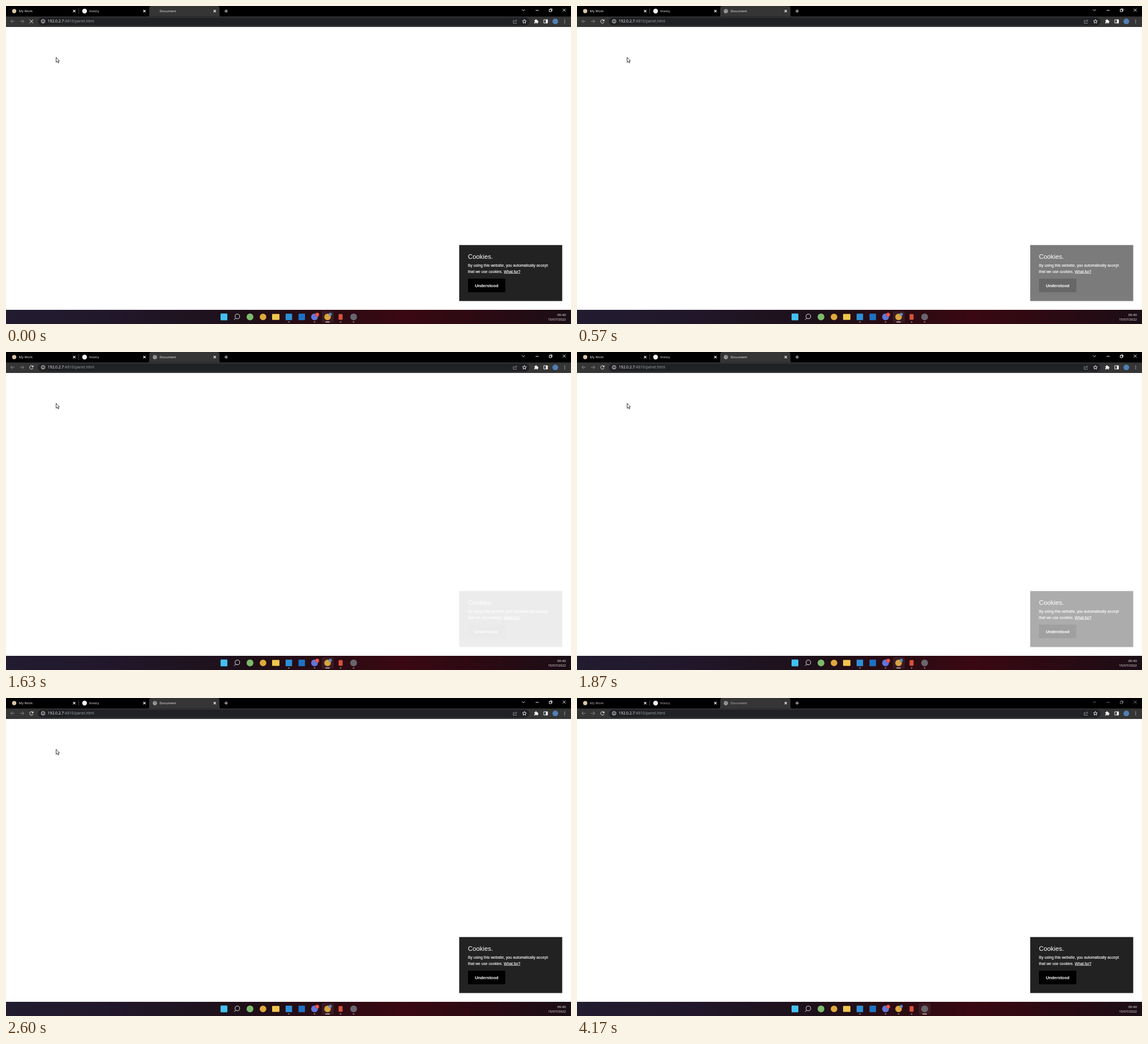
Animation, 998 px wide and 561 px high, one loop 4260 ms. Source, as an HTML page:

```html
<!DOCTYPE html>
<html lang="en">
<head>
<meta charset="utf-8">
<title>Cookie notice</title>
<style>
  html, body { margin: 0; width: 100%; height: 100%; overflow: hidden; background: #fff; }
  svg { display: block; width: 100vw; height: 100vh; }
  .ui { font: 6px "Open Sans", "Noto Sans", sans-serif; fill: #f2f2f2; }
  .url { font-size: 6.75px; fill: #9aa0a6; }
  .url tspan { fill: #f1f1f1; }
  .page { font: 6.77px "Liberation Sans", Arial, sans-serif; fill: #fff; }
  .copy { stroke: #fff; stroke-width: .12; }
  .line { fill: none; stroke: #e8e8e8; stroke-width: 1; }
  .dim { stroke: #85868a; }
  .blurred .tab { fill: #c2c2c2; }
  .blurred .win { stroke: #77787a; }
</style>
</head>
<body>
<svg id="stage" viewBox="0 0 998 561" preserveAspectRatio="none">
  <defs>
    <linearGradient id="bar">
      <stop offset="0" stop-color="#221c30"/>
      <stop offset=".2" stop-color="#21172a"/>
      <stop offset=".42" stop-color="#1e1019"/>
      <stop offset=".58" stop-color="#2b0b13"/>
      <stop offset=".7" stop-color="#3a0812"/>
      <stop offset=".85" stop-color="#2b0a13"/>
      <stop offset="1" stop-color="#1b0e16"/>
    </linearGradient>
  </defs>
  <rect width="998" height="561" fill="#fff"/>

  <!-- tab strip -->
  <rect width="998" height="19" fill="#000"/>
  <path d="M250 18.500Q253 18.500 253 15V4Q253 0 257 0H373Q377 0 377 4V15Q377 18.500 380 18.500Z" fill="#353535"/>
  <path d="M128.500 4V14" class="line" stroke-opacity=".3"/>
  <circle cx="14.500" cy="9" r="3.700" fill="#dcc5a6"/>
  <circle cx="138.800" cy="9" r="4.200" fill="#f4f4f4"/>
  <g id="favicon">
    <circle cx="263" cy="9" r="3.700" fill="#a0a2a5"/>
    <path d="M260 8Q262 7 263 9T265.500 11M262.500 5.800Q264 7.500 266 7.200" fill="none" stroke="#55575a" stroke-width=".9"/>
  </g>
  <g class="ui">
    <text class="tab" x="22.500" y="11">My Work</text>
    <text class="tab" x="146.700" y="11">Vostry</text>
    <text class="tab" x="271.200" y="11">Document</text>
  </g>
  <g id="closers" class="line"></g>
  <path class="line" d="M385.700 9H392M388.850 5.850V12.150"/>
  <g class="line win">
    <path class="line win" d="M911.500 6L914 8.500 916.500 6" stroke-width=".9"/>
    <path class="line win" d="M935.500 7.700H941"/>
    <path class="line win" d="M959.500 6.200H963.300V10H959.500ZM960.700 6V5H964.500V8.800H963.500" stroke-width=".8"/>
    <path class="line win" d="M983.500 4.800L988.500 9.800M988.500 4.800L983.500 9.800"/>
  </g>

  <!-- toolbar -->
  <rect y="18.500" width="998" height="18.500" fill="#353535"/>
  <rect x="56.500" y="20.500" width="868" height="14" rx="7" fill="#202124"/>
  <path d="M15 27H8.500M11.500 24L8.500 27 11.500 30M25 27H31.500M28.500 24L31.500 27 28.500 30" class="line dim"/>
  <path id="stop" class="line" d="M41.700 24L48 30.300M48 24L41.700 30.300" stroke-width="1.200"/>
  <g id="reload">
    <path class="line" d="M47.400 25.300A3.100 3.100 0 1 0 47.800 28.300" stroke-width="1.100"/>
    <path d="M48.400 23.300V26.700H45Z" fill="#e8e8e8"/>
  </g>
  <circle cx="65.500" cy="27" r="3.200" class="line" stroke-width=".8"/>
  <path d="M65.500 26.500V29M65.500 25V25.800" class="line" stroke-width=".9"/>
  <text class="ui url" x="73.700" y="29.400"><tspan>192.0.2.7</tspan>:4810/panel.html</text>
  <path class="line dim" d="M897.500 25.500H896V30.500H901.500V29M897.700 28.300Q898 25.800 901.500 25.800M900.300 24L902.300 25.800 900.300 27.600" stroke-width=".9"/>
  <path class="line" id="star" stroke-width=".8"/>
  <path d="M933.200 24.900H935Q934.900 23.200 936.200 23.200T937.400 24.900H939.200V26.500Q940.500 26.500 940.500 27.700T939.200 28.900V30.700H937.400Q937.300 29.500 936.200 29.500T935 30.700H933.200V28.900Q934.300 28.800 934.300 27.700T933.200 26.500Z" fill="#f0f0f0"/>
  <path class="line" d="M949.900 24.200H956.600V30H949.900Z"/>
  <path d="M953.500 24H957V30.200H953.500Z" fill="#f0f0f0"/>
  <circle cx="970.300" cy="27.200" r="5" fill="#517fb5"/>
  <path d="M986.800 24V25.300M986.800 26.500V27.800M986.800 29V30.300" class="line" stroke-width="1.400"/>

  <!-- notice -->
  <g id="notice" class="page">
    <rect x="800.500" y="421.700" width="182" height="98.800" fill="#222"/>
    <text x="816" y="446" font-size="11.350">Cookies.</text>
    <text class="copy" x="816" y="460.300">By using this website, you automatically accept</text>
    <text class="copy" x="816" y="470.500">that we use cookies.</text>
    <text class="copy" x="879.300" y="470.500">What for?</text>
    <path d="M879.300 471.700H908.600" stroke="#fff" stroke-width=".7"/>
    <rect x="816" y="481" width="66" height="24" fill="#000"/>
    <text x="828.200" y="495.500" font-size="7.400" font-weight="700">Understood</text>
  </g>

  <!-- taskbar -->
  <rect y="536" width="998" height="25" fill="url(#bar)"/>
  <rect id="browserGlow" x="558" y="538.500" width="21" height="20" rx="2" fill="#fff" opacity=".07"/>
  <rect id="recorderGlow" x="603.500" y="538.500" width="21" height="20" rx="2" fill="#fff" opacity=".07"/>
  <g id="apps"></g>
  <circle cx="408.700" cy="547.600" r="4.100" class="line" stroke-width="1.200"/>
  <path d="M405.800 550.700L402.900 553.700" class="line" stroke-width="1.300"/>
  <circle cx="549.700" cy="544.500" r="3.500" fill="#e5403d"/>
  <text class="ui" x="549.700" y="546.500" font-size="5" text-anchor="middle">1</text>
  <circle cx="572.800" cy="544" r="2.700" fill="#5d88b8"/>
  <g id="marks"></g>
  <g class="ui" text-anchor="end">
    <text x="989" y="546.800">09:40</text>
    <text x="989" y="554.800">15/07/2022</text>
  </g>

  <path id="cursor" d="M0 0V8.800L2 7 3.400 10 4.800 9.400 3.500 6.500H5.900Z" fill="#fff" stroke="#111" stroke-width=".8"/>
</svg>
<script>
const LOOP = 4260, FADE = 820;
const LOADS = [[0, 86], [1480, 1568]];
const MOVE = { start: 3320, end: 3960, from: [88.5, 90.5], to: [612, 546] };
const HIDE = 4070, BLUR = 4100;

const $ = id => document.getElementById(id);
const clamp = v => Math.max(0, Math.min(1, v));
const show = (id, on) => { $(id).style.display = on ? '' : 'none'; };

function add(parent, tag, attrs) {
  const el = document.createElementNS('http://www.w3.org/2000/svg', tag);
  for (const key in attrs) el.setAttribute(key, attrs[key]);
  return $(parent).appendChild(el);
}

for (const x of [120.5, 244.5, 368.7]) {
  add('closers', 'path', { d: `M${x - 2} 7l4 4m0 -4l-4 4`, 'stroke-width': 1.1 });
}

const starPoints = Array.from({ length: 10 }, (_, i) => {
  const r = i % 2 ? 1.7 : 3.7, a = i * Math.PI / 5;
  return `${915.7 + r * Math.sin(a)} ${27.3 - r * Math.cos(a)}`;
});
$('star').setAttribute('d', `M${starPoints.join('L')}Z`);

const disc = (x, r, fill) => add('apps', 'circle', { cx: x, cy: 548.5, r, fill });
const block = (x, w, h, fill) =>
  add('apps', 'rect', { x: x - w / 2, y: 548.5 - h / 2, width: w, height: h, rx: 1, fill });

block(385, 12, 12, '#43c0ef');
disc(431, 6, '#7dbb6c');
disc(454, 5.8, '#e0a93c');
block(476.5, 13, 10.5, '#f0c64d');
block(499.6, 11.5, 11.5, '#2d8fd5');
block(522.4, 11.5, 11.5, '#1d72c4');
disc(545, 6, '#6075dc');
disc(568, 5.8, '#d9a441');
block(591, 7, 10, '#d9523b');
disc(614, 6, '#69656c');

const mark = x => add('marks', 'rect', { y: 556.8, height: 1.5, rx: .75, 'data-x': x });
function setMark(el, active) {
  const w = active ? 8 : 3;
  el.setAttribute('x', el.dataset.x - w / 2);
  el.setAttribute('width', w);
  el.setAttribute('fill', active ? '#d8c6ca' : '#a69ba2');
}
for (const x of [499.6, 545, 591]) setMark(mark(x), false);
const browserMark = mark(568), recorderMark = mark(614);

function render(t) {
  const loading = LOADS.some(([a, b]) => t >= a && t < b);
  const last = LOADS.filter(([, b]) => t >= b).pop();
  $('notice').style.opacity = loading || !last ? 1 : clamp((t - last[1]) / FADE);
  show('stop', loading);
  show('reload', !loading);
  show('favicon', !loading);

  const p = clamp((t - MOVE.start) / (MOVE.end - MOVE.start));
  const e = p * p * (3 - 2 * p);
  const [x, y] = MOVE.from.map((v, i) => v + (MOVE.to[i] - v) * e);
  $('cursor').setAttribute('transform', `translate(${x} ${y})`);
  show('cursor', t < HIDE);

  const blurred = t >= BLUR;
  $('stage').classList.toggle('blurred', blurred);
  show('browserGlow', !blurred);
  show('recorderGlow', t >= MOVE.end);
  setMark(browserMark, !blurred);
  setMark(recorderMark, blurred);
}

const begin = performance.now();
function tick() {
  render((performance.now() - begin) % LOOP);
  requestAnimationFrame(tick);
}
tick();
</script>
</body>
</html>
```
